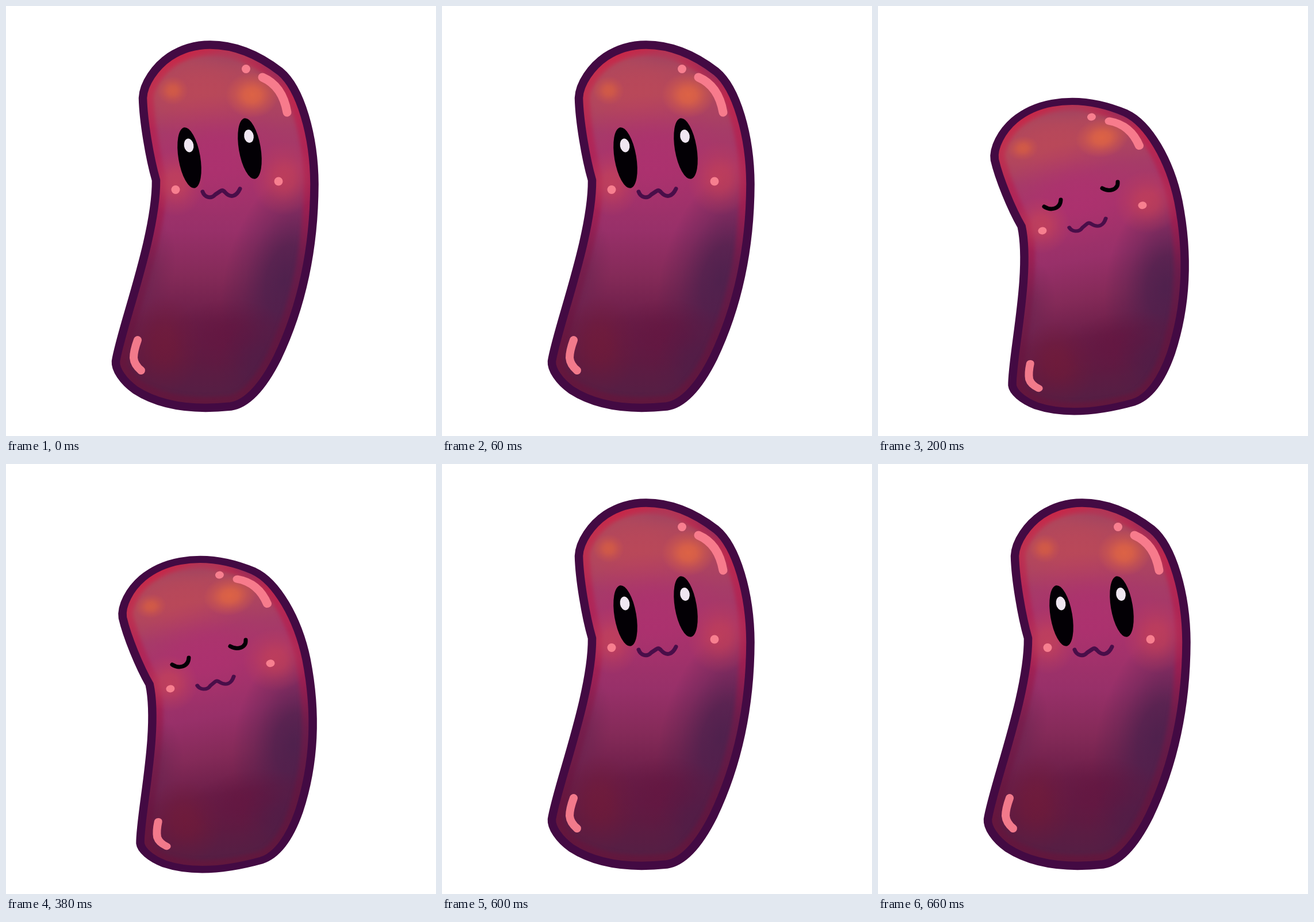
Recreate the animation shown at these times as an HTML page with a canvas. Size 748 px wide and 748 px high, loop 700 ms.

```html
<!DOCTYPE html>
<html lang="en">
<head>
<meta charset="utf-8">
<title>Squishing bean</title>
<style>
  html, body { margin: 0; width: 100%; height: 100%; overflow: hidden; background: #fff; }
  canvas { display: block; width: 748px; height: 748px; }
</style>
</head>
<body>
<canvas id="stage" width="748" height="748"></canvas>
<script>
const ctx = document.getElementById('stage').getContext('2d');
const LOOP = 700;

const body = new Path2D(`M355 67.5 C405 67.5 446 90 477 114 C512 143 536 225 536.5 310
  C536 420 515 522 472 612 C448 660 420 692 391 696.5 C330 703 270 697 225 668
  C203 652 190 632 191 618 C200 560 262 400 261 303 C250 265 239 200 238 160
  C239 135 260 105 285 88 C305 75 330 67.5 355 67.5Z`);
const mouth = new Path2D('M342 323 C345 332 356 337 364 328 L373 322 Q377 319 381 324 C391 335 401 331 407 318');
const topShine = new Path2D('M446 124 Q481 139 489 185');
const lowShine = new Path2D('M229 581 Q222 600 222 612 Q223 624 235 634');

// Each pose squashes and shears the whole body; the eyes are placed separately.
const tall = {
  matrix: [1, 0, 0, 1, 0, 0],
  eyes: [
    { x: 319, y: 264, rx: 19, ry: 53.5, tilt: -0.17, shineX: 318, shineY: 242.5, shineR: 12 },
    { x: 424, y: 248, rx: 19, ry: 53.5, tilt: -0.17, shineX: 422.5, shineY: 226.5, shineR: 11.5 }
  ]
};
const leaning = {
  matrix: [0.995, -0.127, 0.133, 0.945, -48, 83.9],
  eyes: [
    { x: 305.5, y: 300.5, rx: 20, ry: 42, tilt: -0.24, shineX: 306, shineY: 289, shineR: 11 },
    { x: 409, y: 276, rx: 19.5, ry: 37.5, tilt: -0.2, shineX: 409, shineY: 260, shineR: 10.5 }
  ]
};
const squashed = {
  matrix: [0.986, -0.179, 0.168, 0.838, -58.6, 176],
  lids: new Path2D('M289 349 C300 356 317 354 318 337 M390 317 C402 324 418 320 417 306')
};

function poseAt(time) {
  if (time < 100 || time >= 600) return tall;
  if (time < 200 || time >= 500) return leaning;
  return squashed;
}

function verticalGradient(stops) {
  const gradient = ctx.createLinearGradient(0, 67, 0, 700);
  for (const [y, color] of stops) gradient.addColorStop((y - 67) / 633, color);
  return gradient;
}

function glow(x, y, rx, ry, rgb, alpha, tilt = 0) {
  ctx.save();
  ctx.translate(x, y);
  ctx.rotate(tilt);
  ctx.scale(rx, ry);
  const gradient = ctx.createRadialGradient(0, 0, 0, 0, 0, 1);
  for (const [stop, share] of [[0, 1], [0.3, 0.85], [0.65, 0.35], [1, 0]]) {
    gradient.addColorStop(stop, `rgba(${rgb},${alpha * share})`);
  }
  ctx.fillStyle = gradient;
  ctx.fillRect(-1, -1, 2, 2);
  ctx.restore();
}

function ellipse(x, y, rx, ry, tilt, color) {
  ctx.fillStyle = color;
  ctx.beginPath();
  ctx.ellipse(x, y, rx, ry, tilt, 0, Math.PI * 2);
  ctx.fill();
}

function line(path, width, color) {
  ctx.lineWidth = width;
  ctx.strokeStyle = color;
  ctx.stroke(path);
}

function drawShading() {
  ctx.save();
  ctx.clip(body);
  ctx.fillStyle = verticalGradient([
    [67, '#a54660'], [150, '#b0485c'], [215, '#a63c67'], [290, '#a7336b'], [390, '#983069'],
    [470, '#842a58'], [550, '#691d47'], [620, '#5e1b42'], [700, '#522045']
  ]);
  ctx.fillRect(150, 40, 420, 690);

  // Lower shadows
  glow(485, 475, 105, 200, '74,32,76', 0.9, 0.25);
  glow(240, 480, 50, 110, '106,36,80', 0.6, 0.25);
  glow(275, 590, 65, 85, '118,26,52', 0.55);
  glow(390, 575, 110, 65, '98,20,63', 0.6);
  glow(445, 625, 75, 95, '76,30,72', 0.6, 0.3);

  // Rim light
  ctx.filter = 'blur(3px)';
  line(body, 38, verticalGradient([
    [67, 'rgba(208,30,66,.9)'], [200, 'rgba(185,32,78,.75)'], [350, 'rgba(165,26,76,.7)'],
    [450, 'rgba(120,24,72,.6)'], [560, 'rgba(105,20,62,.6)'], [700, 'rgba(108,18,56,.55)']
  ]));
  ctx.filter = 'none';

  // Upper lights
  glow(470, 105, 80, 34, '134,48,96', 0.8, 0.7);
  glow(390, 88, 80, 28, '156,66,98', 0.6);
  glow(340, 150, 140, 82, '188,72,88', 0.75);
  glow(365, 260, 130, 105, '174,48,112', 0.75);
  glow(295, 308, 50, 58, '198,68,88', 0.75);
  glow(484, 300, 58, 64, '194,64,88', 0.8);
  glow(290, 147, 27, 25, '218,96,64', 0.75);
  glow(428, 155, 46, 40, '226,102,66', 0.88);
  ctx.restore();
}

function drawEye(eye) {
  ellipse(eye.x, eye.y, eye.rx, eye.ry, eye.tilt, '#030005');
  ellipse(eye.shineX, eye.shineY, 8.3, eye.shineR, eye.tilt, '#efe6f1');
}

function draw(pose) {
  ctx.fillStyle = '#fff';
  ctx.fillRect(0, 0, 748, 748);
  ctx.lineCap = ctx.lineJoin = 'round';

  ctx.save();
  ctx.transform(...pose.matrix);
  drawShading();
  line(body, 14.5, '#430a43');
  line(topShine, 15, '#f77b8c');
  line(lowShine, 14, '#f27a8b');
  for (const [x, y] of [[417.5, 109.5], [295, 319.5], [474, 305]]) {
    ellipse(x, y, 7.5, 7.5, 0, '#f77f8f');
  }
  line(mouth, 7, '#490e49');
  ctx.restore();

  if (pose.lids) line(pose.lids, 7, '#030005');
  else pose.eyes.forEach(drawEye);
}

const start = performance.now();
let shown = null;

function tick() {
  const pose = poseAt((performance.now() - start) % LOOP);
  if (pose !== shown) draw(shown = pose);
  requestAnimationFrame(tick);
}
tick();
</script>
</body>
</html>
```
